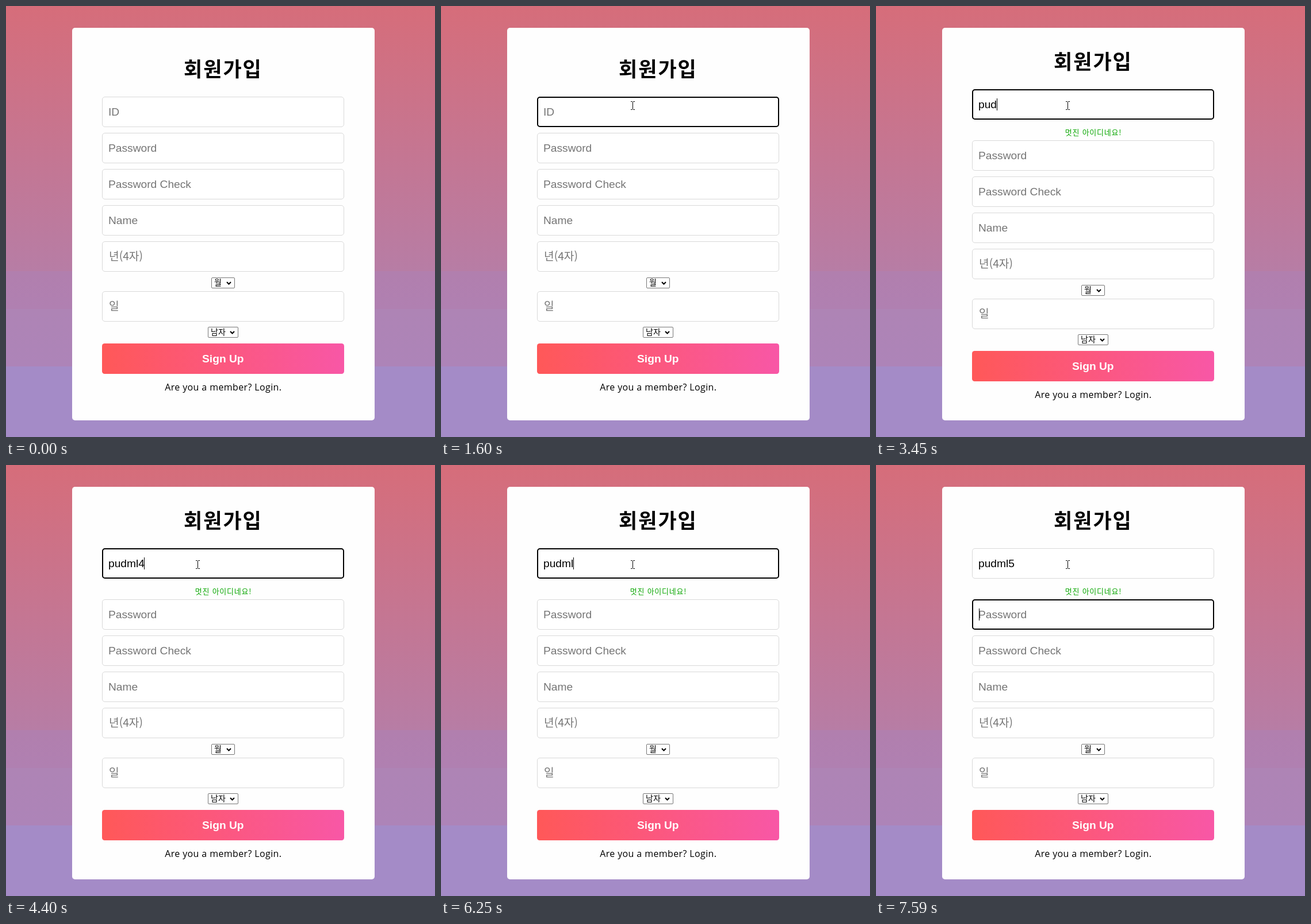
An HTML page for the animation above (8 s loop, 746 px wide and 751 px high).

```html
<!DOCTYPE html>
<html lang="ko">
<head>
<meta charset="utf-8">
<style>
  html, body { margin: 0; width: 100%; height: 100%; overflow: hidden; }
  body {
    background: linear-gradient(#d66d7a, #b77da5 462px, #b17fae 462px, #b080b1 528px,
      #ae84b5 528px, #ad84b8 628px, #a48bc7 628px);
  }
  svg { display: block; font: 19.2px "Liberation Sans", Arial, sans-serif; }
  .ko { font-family: "Noto Sans CJK KR", "Noto Sans CJK", sans-serif; }
  .thin { font-weight: 300; }
  .mid { text-anchor: middle; }
  .hint { fill: #757575; }
  .field { fill: #fff; stroke: #d9d9d9; }
  .select { fill: #fff; stroke: #767676; }
  .line { fill: none; stroke: #000; }
  #title { font-size: 35px; font-weight: 700; letter-spacing: 2px; }
  #message { font-size: 13px; letter-spacing: .75px; }
  #link { font: 16px "Open Sans", "Noto Sans", sans-serif; letter-spacing: .38px; }
  .option { font-size: 14px; }
</style>
</head>
<body>
<svg width="746" height="751" viewBox="0 0 746 751">
  <defs>
    <linearGradient id="pink"><stop stop-color="#ff5858"/><stop offset="1" stop-color="#f857a6"/></linearGradient>
  </defs>
  <rect x="115" y="38" width="526" height="684" rx="5" fill="#fefefe"/>
  <g id="upper">
    <text id="title" class="ko" x="309" y="123">회원가입</text>
  </g>
  <text id="message" class="ko mid" x="378" y="225"></text>
  <g id="lower">
    <rect x="167" y="588" width="421" height="53" rx="4.5" fill="url(#pink)"/>
    <text class="mid" x="377.3" y="621" font-weight="700" fill="#fff">Sign Up</text>
    <text id="link" class="mid" x="377.8" y="670">Are you a member? Login.</text>
  </g>
  <text id="typed" x="178" y="178"></text>
  <path id="squiggle" fill="none" stroke="#f00"/>
  <rect id="focus" class="line" x="168" width="419" height="51" rx="4" stroke-width="2"/>
  <rect id="caret" width="1" height="21"/>
  <path id="arrow" d="M.5 .5V16l3.6-3.4 2.5 5.8 2.3-1-2.5-5.6h5z" fill="#fff" stroke="#000"/>
  <path id="beam" class="line" d="M330 166.5h2.5l1 1 1-1h2.5M333.5 167.500v12M330 180.500h2.500l1-1 1 1h2.500"/>
</svg>
<script>
const $ = id => document.getElementById(id);
const show = (id, on) => $(id).setAttribute('visibility', on ? 'visible' : 'hidden');
const add = (group, markup) => $(group).insertAdjacentHTML('beforeend', markup);

function field(group, y, hint, korean) {
  add(group, `<rect class="field" x="167.5" y="${y + .5}" width="420" height="52" rx="4.5"/>
    <text class="hint ${korean ? 'ko thin' : ''}" x="${korean ? 179 : 178}" y="${y + 33}">${hint}</text>`);
}
function select(x, y, width, label) {
  add('lower', `<rect class="select" x="${x + .5}" y="${y + .5}" width="${width - 1}" height="18" rx="1.5"/>
    <text class="ko option" x="${x + 5}" y="${y + 14}">${label}</text>
    <path class="line" stroke-width="2" d="M${x + width - 14} ${y + 8}l3.500 3.500 3.500-3.500"/>`);
}
field('upper', 158, 'ID');
field('lower', 221, 'Password');
field('lower', 284, 'Password Check');
field('lower', 347, 'Name');
field('lower', 410, '년(4자)', true);
select(357, 473, 41, '월');
field('lower', 497, '일', true);
select(351, 559, 53, '남자');
const idHint = document.querySelector('#upper .hint');
$('squiggle').setAttribute('d', 'M179 181.5' + 'l2-2 2 2'.repeat(15));

const CARET_X = [179, 189, 200, 210, 226, 230, 240];
const GOOD = ['멋진 아이디네요!', '#08a600'];
const TAKEN = ['이미 사용중이거나 탈퇴한 아이디입니다.', '#f00'];
// [start time, value] pairs
const TYPING = [[0, ''], [2130, 'p'], [3320, 'pu'], [3450, 'pud'], [3720, 'pudm'], [4000, 'pudml'],
  [4400, 'pudml4'], [6120, 'pudml'], [6530, 'pudml5']];
const MESSAGES = [[0, ['', '']], [2130, GOOD], [4530, TAKEN], [6250, GOOD]];
const CARET = [[0, false], [1070, true], [1600, false], [2130, true], [2660, false], [3190, true],
  [5060, false], [5590, true], [7060, false], [7590, true]];
const at = (track, t) => track.findLast(([start]) => t >= start)[1];
const within = (t, a, b) => t >= a && t < b;

function draw(t) {
  const text = at(TYPING, t), [message, color] = at(MESSAGES, t);
  const shift = text ? 13 : 0, onPassword = t >= 7590;
  const fieldY = onPassword ? 234 : 158 - shift;
  $('upper').setAttribute('transform', `translate(0 ${-shift})`);
  $('lower').setAttribute('transform', `translate(0 ${shift})`);
  $('typed').textContent = text;
  idHint.setAttribute('visibility', text ? 'hidden' : 'visible');
  $('message').textContent = message;
  $('message').setAttribute('fill', color);
  $('focus').setAttribute('y', fieldY + 1);
  show('focus', t >= 1070);
  $('caret').setAttribute('x', CARET_X[onPassword ? 0 : text.length]);
  $('caret').setAttribute('y', fieldY + 16);
  show('caret', at(CARET, t));
  show('squiggle', within(t, 5590, 6120));
  $('arrow').setAttribute('transform', t < 530 ? 'translate(458 104)' : 'translate(366 142)');
  show('arrow', within(t, 400, 660));
  show('beam', t >= 660);
}
function tick(now) {
  draw(now % 8000);
  requestAnimationFrame(tick);
}
draw(0);
requestAnimationFrame(tick);
</script>
</body>
</html>
```
